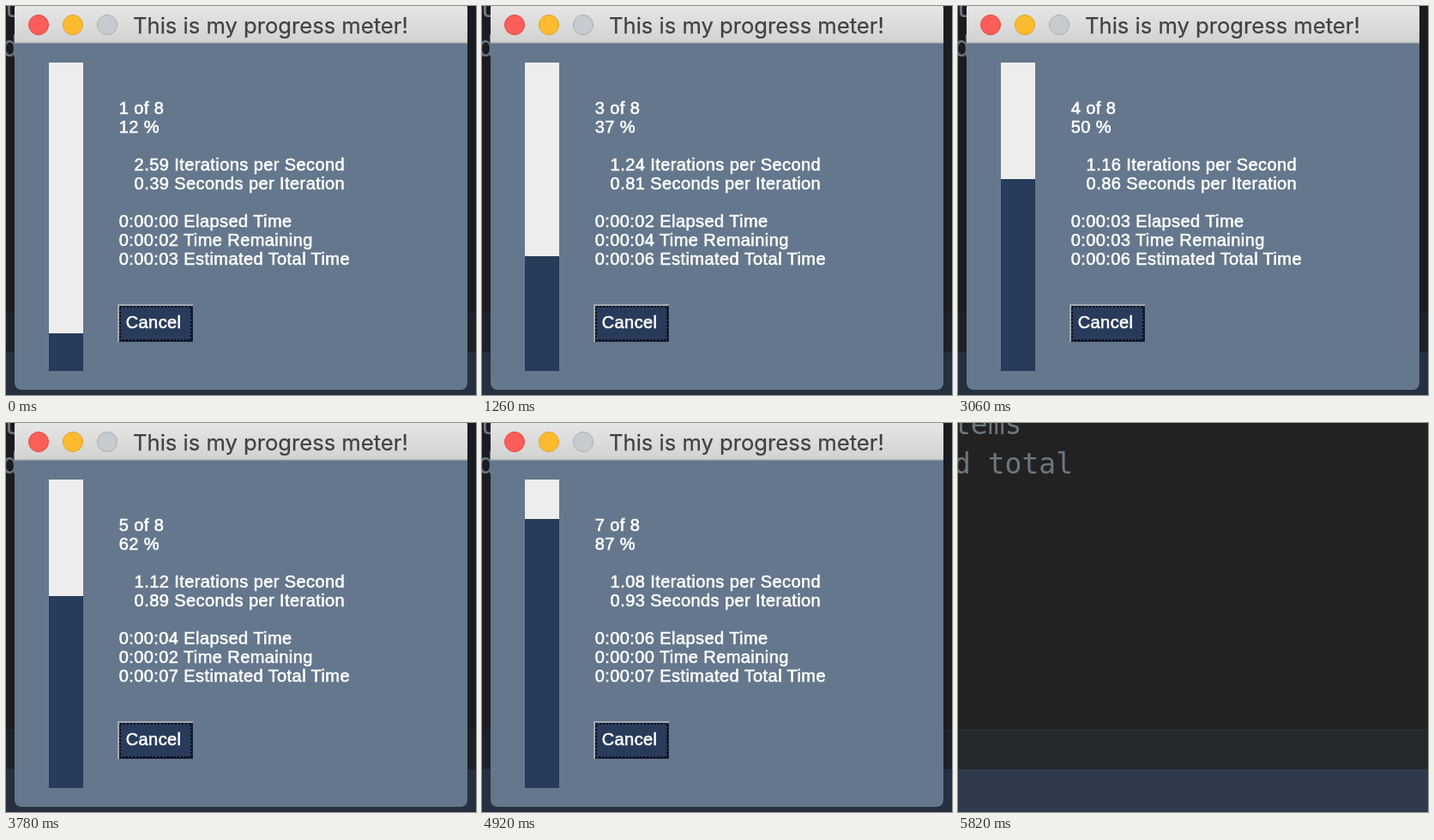
Write an HTML page that moves like this. It is 548 px wide and 454 px high and loops after 5.94 s.

```html
<!DOCTYPE html>
<html lang="en">
<head>
<meta charset="utf-8">
<title>Progress meter</title>
<style>
  html, body { margin: 0; width: 100%; height: 100%; overflow: hidden; background: #222; }
  svg { display: block; width: 548px; height: 454px; }
  text { white-space: pre; }
  .code { font: 33px "DejaVu Sans Mono", monospace; fill: #6e767d; }
  .title { font: 25.6px Inter, sans-serif; fill: #424242; stroke: #424242; stroke-width: .25px; }
  .label { font: 20px "Liberation Sans", Arial, sans-serif; letter-spacing: .42px; fill: #fff; stroke: #fff; stroke-width: .6px; }
</style>
</head>
<body>
<svg viewBox="0 0 548 454">
  <defs>
    <linearGradient id="chrome" x2="0" y2="1">
      <stop offset="0" stop-color="#e8e8e8"/>
      <stop offset="1" stop-color="#d2d2d2"/>
    </linearGradient>
    <clipPath id="frame"><rect x="10" y="-5" width="528" height="453" rx="8"/></clipPath>
  </defs>

  <!-- editor behind the window -->
  <rect width="548" height="454" fill="#222"/>
  <rect y="358" width="548" height="46" fill="#26292b"/>
  <rect y="358" width="548" height="1" fill="#26323b"/>
  <rect y="404" width="548" height="50" fill="#2f3b4c"/>
  <rect id="shade" width="548" height="454" fill="#060c18" opacity=".24"/>
  <text class="code" x="-5" y="13">tems</text>
  <text class="code" x="-5" y="59">d total</text>

  <g id="meter">
    <g clip-path="url(#frame)">
      <rect x="10" y="-5" width="528" height="453" fill="#64778d"/>
      <rect x="10" y="-5" width="528" height="48" fill="url(#chrome)"/>
      <rect x="10" y="42" width="528" height="1.5" fill="#b9bcc0"/>
    </g>
    <circle cx="38" cy="22" r="11.5" fill="#fc5f59" stroke="#e2463f"/>
    <circle cx="78" cy="22" r="11.5" fill="#fdbc2f" stroke="#dfa023"/>
    <circle cx="118" cy="22" r="11.5" fill="#c6cbd0" stroke="#a8aeb4"/>
    <text class="title" x="148" y="32">This is my progress meter!</text>

    <rect x="50" y="66" width="40" height="360" fill="#ededed"/>
    <rect id="bar" x="50" width="40" fill="#283b5b"/>
    <g id="lines"></g>

    <rect x="130" y="348" width="88" height="44" fill="#283b5b"/>
    <path d="M131 391H217V349" fill="none" stroke="#18243a" stroke-width="2"/>
    <path d="M131 392V349H218" fill="none" stroke="#a3a9b1" stroke-width="2"/>
    <rect x="133" y="351" width="83" height="39" fill="none" stroke="#05070b" stroke-width="2" stroke-dasharray="2 2"/>
    <text class="label" x="139.7" y="376">Cancel</text>
  </g>
</svg>
<script>
  const LOOP = 5940, CLOSE = 5820, LAG = 60, TOTAL = 8;
  const ticks = [300, 1200, 2100, 3060, 3960, 4860];
  const speeds = [2.59, 1.42, 1.24, 1.16, 1.12, 1.10, 1.08];
  const paces = [0.39, 0.70, 0.81, 0.86, 0.89, 0.91, 0.93];
  const baselines = [126, 148, 192, 214, 258, 280, 302];

  const byId = id => document.getElementById(id);
  const meter = byId("meter"), shade = byId("shade"), bar = byId("bar");
  const lines = baselines.map(y => {
    const el = document.createElementNS("http://www.w3.org/2000/svg", "text");
    el.setAttribute("class", "label");
    el.setAttribute("x", 131.7);
    el.setAttribute("y", y);
    return byId("lines").appendChild(el);
  });

  const countAt = t => 1 + ticks.filter(tick => t >= tick).length;
  const clock = s => "0:00:0" + Math.floor(s);

  function report(n) {
    const pace = paces[n - 1];
    return [
      `${n} of ${TOTAL}`,
      `${Math.floor(n * 100 / TOTAL)} %`,
      `   ${speeds[n - 1].toFixed(2)} Iterations per Second`,
      `   ${pace.toFixed(2)} Seconds per Iteration`,
      `${clock(pace * n)} Elapsed Time`,
      `${clock(pace * (TOTAL - n))} Time Remaining`,
      `${clock(pace * TOTAL)} Estimated Total Time`
    ];
  }

  let shown = 0;
  function draw(now) {
    const t = now % LOOP;
    meter.style.display = shade.style.display = t < CLOSE ? "" : "none";

    const height = 2 * Math.floor(countAt(t) * 22.5);
    bar.setAttribute("y", 426 - height);
    bar.setAttribute("height", height);

    // the text follows the bar a moment later
    const n = countAt(t - LAG);
    if (n !== shown) {
      report(n).forEach((s, i) => lines[i].textContent = s);
      shown = n;
    }
  }

  const start = performance.now();
  function loop() {
    draw(performance.now() - start);
    requestAnimationFrame(loop);
  }
  loop();
</script>
</body>
</html>
```
